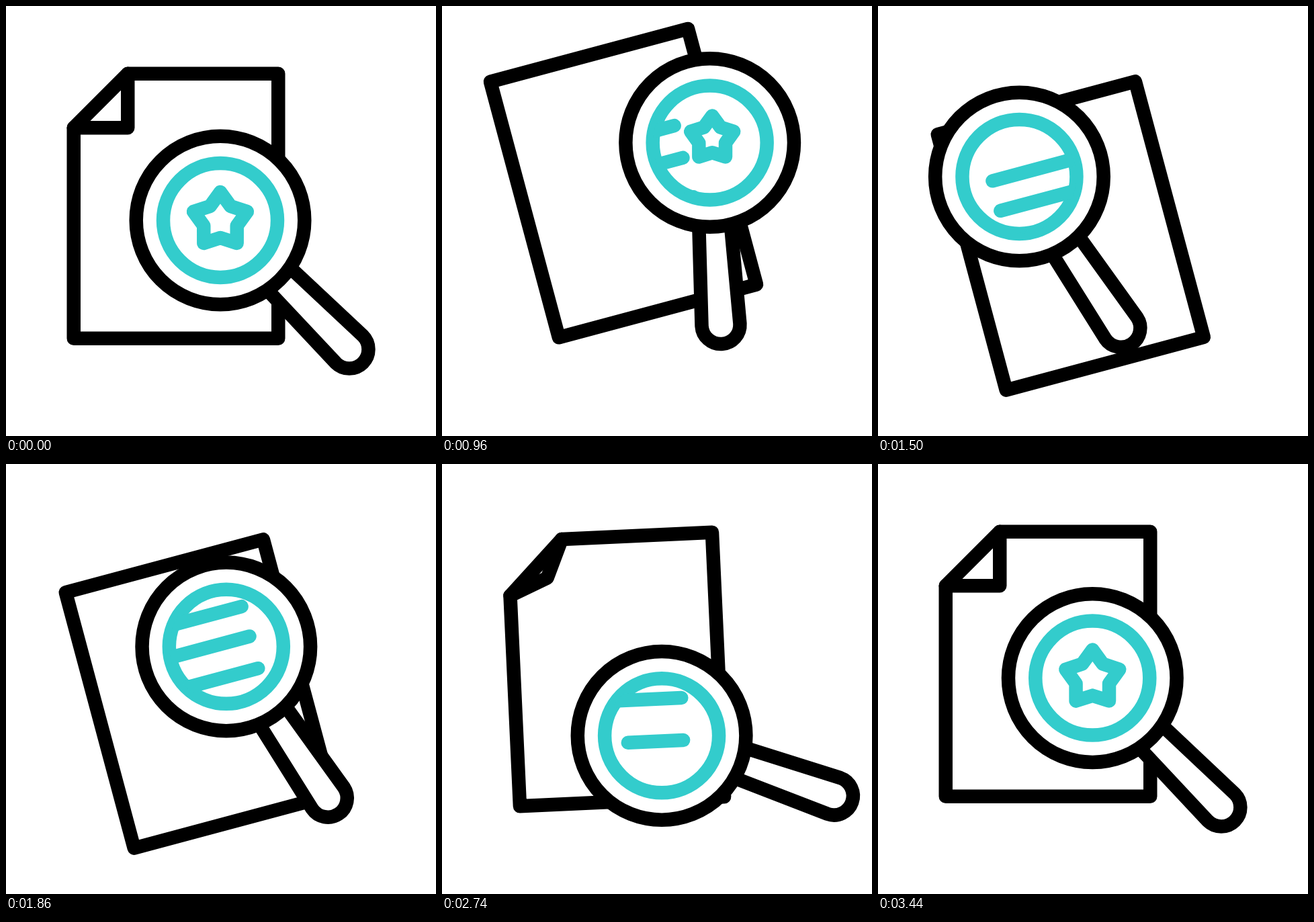
Write an HTML page with a canvas that moves like this. It is 640x640 px and loops after 3.6 s.

```html
<!DOCTYPE html>
<html lang="en">
<head>
<meta charset="utf-8">
<title>Document search</title>
<style>
  html, body { margin: 0; width: 100%; height: 100%; overflow: hidden; background: #fff; }
  canvas { display: block; width: 100vmin; height: 100vmin; }
</style>
</head>
<body>
<canvas id="stage" width="640" height="640"></canvas>
<script>
const LOOP = 3600;
const INK = '#000', TEAL = '#33cccc', STROKE = 20.5;
const PAPER_W = 304.5, PAPER_H = 394, CUT = 80.5;
const RIM = 125.3, GLASS = 85, HANDLE = 271.5, GRIP = 28.5;
const ctx = document.getElementById('stage').getContext('2d');

const rad = deg => deg * Math.PI / 180;
const clamp = v => Math.min(1, Math.max(0, v));

// Eased 0 to 1 from a start time over a span
function step(t, start, span) {
  const u = clamp((t - start) / span);
  return u * u * (3 - 2 * u);
}

// Rises to 1, stays, and falls back to 0
const hump = (t, up, down, upSpan = 520, downSpan = 520) =>
  step(t, up, upSpan) - step(t, down, downSpan);

// Key poses of the magnifier: x, y, turn in degrees
const home = [319, 319, 0], aside = [464, 189, 51], above = [448, 145, 51];
const left = [188, 250.5, 11.1], right = [355, 276, 11.1];
const back = [214, 313, 11.1], low = [329.5, 406.3, -26.5];
const ROUTE = [
  [aside, 190, 665], [left, 832, 1240], [right, 1340, 2040], [back, 2040, 2400],
  [low, 2400, 2773], [above, 2790, 3120], [home, 3120, 3450]
];

function lensAt(t) {
  return ROUTE.reduce((from, [to, start, end]) => {
    const p = step(t, start, end - start);
    return from.map((v, i) => v + (to[i] - v) * p);
  }, home);
}

function trace(points, close) {
  ctx.beginPath();
  points.forEach(([x, y]) => ctx.lineTo(x, y));
  if (close) ctx.closePath();
  ctx.stroke();
}

function circle(r) {
  ctx.beginPath();
  ctx.arc(0, 0, r, 0, 2 * Math.PI);
}

function placePaper(t) {
  const tilt = hump(t, 200, 2360);
  const slide = hump(t, 680, 2360, 560);
  const drop = hump(t, 890, 2360, 355);
  ctx.translate(253 + 33.8 * slide, 297.7 - 43.2 * tilt + 87.5 * drop);
  ctx.rotate(rad(-15 * tilt));
  ctx.translate(-PAPER_W / 2, -PAPER_H / 2);
}

function drawPaper(t) {
  const c = CUT * (1 - hump(t, 360, 2410));
  ctx.save();
  placePaper(t);
  trace([[0, CUT], [0, PAPER_H], [PAPER_W, PAPER_H], [PAPER_W, 0], [CUT, 0], [c, c]], true);
  if (c > CUT / 2) trace([[CUT, 0], [0, CUT]]);
  ctx.restore();
}

function drawHandle(turn) {
  ctx.save();
  ctx.rotate(rad(turn - 45));
  ctx.beginPath();
  ctx.moveTo(-23.5, 115);
  ctx.arc(0, HANDLE, GRIP, Math.PI, 0, true);
  ctx.lineTo(23.5, 115);
  ctx.fill();
  ctx.stroke();
  ctx.restore();
}

// The text can only be seen through the glass
function drawText(x, y, t) {
  ctx.save();
  circle(GLASS);
  ctx.clip();
  ctx.translate(-x, -y);
  placePaper(t);
  [88, 134, 183.4, 244, 307].forEach((h, i) => trace([[i < 4 ? 61 : 165, h], [247.5, h]]));
  ctx.restore();
}

function drawStar(t) {
  const away = hump(t, 190, 3120, 475, 330);
  const gone = hump(t, 832, 2800, 358, 320);
  const size = (1 + 0.14 * away) * (1 - gone);
  if (size < 0.02) return;
  const dx = 3.5 * away, dy = 2 * away - 28 * gone;
  ctx.lineWidth = STROKE * clamp(size * 2);
  trace(Array.from({ length: 10 }, (_, i) => {
    const r = (i % 2 ? 26 : 42) * size, a = rad(i * 36 - 90);
    return [dx + r * Math.cos(a), dy + r * Math.sin(a)];
  }), true);
}

function draw(t) {
  ctx.fillStyle = '#fff';
  ctx.fillRect(0, 0, 640, 640);
  ctx.lineCap = ctx.lineJoin = 'round';
  ctx.lineWidth = STROKE;
  ctx.strokeStyle = INK;
  drawPaper(t);

  const [x, y, turn] = lensAt(t);
  ctx.save();
  ctx.translate(x, y);
  drawHandle(turn);
  circle(RIM);
  ctx.fill();
  ctx.stroke();

  ctx.strokeStyle = TEAL;
  circle(GLASS);
  ctx.stroke();
  if (t > 670 && t < 3120) drawText(x, y, t);
  drawStar(t);
  ctx.restore();
}

const begin = performance.now();
function tick() {
  draw((performance.now() - begin) % LOOP);
  requestAnimationFrame(tick);
}
tick();
</script>
</body>
</html>
```
